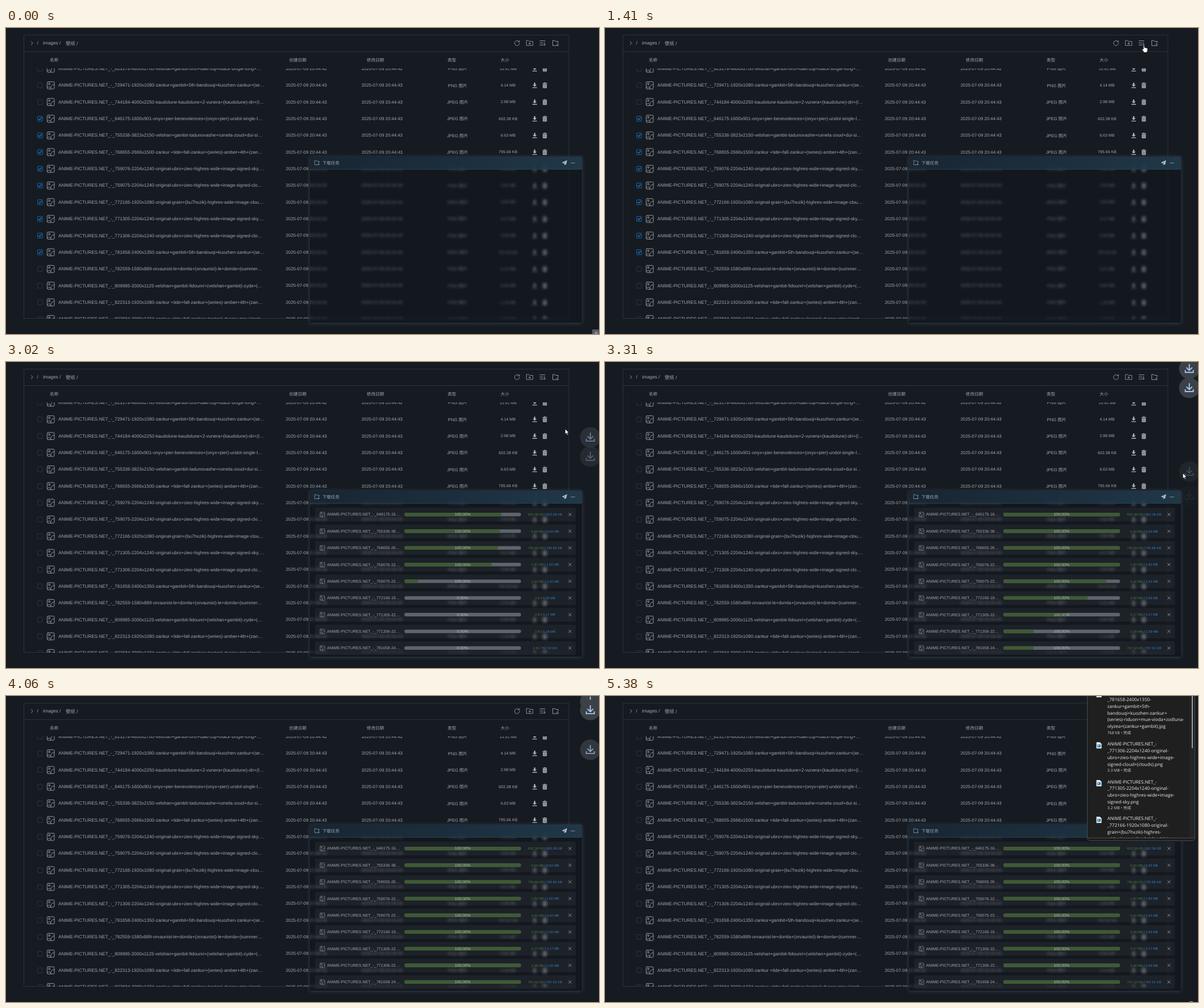
These frames come from a looping animation (1042x538 px, 5560 ms). An HTML page:

```html
<!DOCTYPE html>
<html lang="zh">
<head>
<meta charset="utf-8">
<title>下载任务</title>
<style>
html, body { margin: 0; width: 100%; height: 100%; overflow: hidden; background: #161b22; }
#stage { position: relative; width: 1042px; height: 538px; overflow: hidden; }
svg { position: absolute; left: 0; top: 0; display: block; }
text { font-family: "Liberation Sans", Arial, "Noto Sans CJK SC", "Noto Sans CJK", sans-serif; text-rendering: geometricPrecision; white-space: pre; }
#popup text { font-family: "Open Sans", "Noto Sans", "Noto Sans CJK SC", "Noto Sans CJK", sans-serif; }
#panel { position: absolute; left: 534px; top: 226px; width: 478px; height: 292px; background: rgba(15, 19, 25, .4);
  backdrop-filter: blur(2.2px); box-shadow: 0 1px 7px rgba(150, 165, 185, .26); }
#bar { height: 23px; background: linear-gradient(90deg, rgba(25, 41, 54, .85), rgba(29, 50, 66, .85) 50%, rgba(34, 60, 76, .9)); border-bottom: 1px solid #26414f; box-sizing: border-box; }
.line { fill: none; stroke: #959aa1; stroke-linecap: round; stroke-linejoin: round; }
</style>
</head>
<body>
<div id="stage">
  <svg id="list" width="1042" height="538"></svg>
  <div id="panel"><div id="bar"></div><svg id="tasks" width="478" height="292" viewBox="534 226 478 292"></svg></div>
  <svg id="top" width="1042" height="538"></svg>
</div>
<script>
const LOOP = 5560, PITCH = 29.35, SITE = "ANIME-PICTURES.NET_-_";
const $ = id => document.getElementById(id);
const clamp = v => Math.max(0, Math.min(1, v));
const text = (x, y, str, size, fill = "#a3a6ad", extra = "") =>
  `<text x="${x}" y="${y + size * .35}" font-size="${size}" fill="${fill}" ${extra}>${str}</text>`;
const icon = (x, y, body, scale = 1, extra = "") =>
  `<g transform="translate(${x} ${y}) scale(${scale})" ${extra}>${body}</g>`;
const line = (d, width = 1, extra = "") => `<path class="line" d="${d}" stroke-width="${width}" ${extra}/>`;

const picture = `<rect class="line" x="-6.3" y="-6.3" width="12.6" height="12.6" rx="1.6"/>
  <circle class="line" cx="-2.6" cy="-2.6" r="1.5"/>` + line("M-6 4.5L-3 2.2L0 4.2M0 6C0 1 2 -1.3 6 -1.6");
const save = `<path d="M-1.2-4.5h2.4v3.5H3.6L0 2.4-3.6-1h2.4zM-4 3.4h8v1.3h-8z" fill="#b0b4ba"/>`;
const trash = `<path d="M-4-4h2.3l.7-1h2l.7 1H4v1.2h-8zM-3.5-2.2h7v6.4q0 .8-.8.8h-5.4q-.8 0-.8-.8z" fill="#a6aab0"/>` +
  line("M-1.2-.5v4M1.2-.5v4", .7, 'style="stroke:#3a3f46"');
const folderDown = line("M1 4.5H-5V-4.5H-1.6L-.2-3H4.6V-.6M3.4 .2V5M1.4 3L3.4 5L5.4 3");
const folderPlus = line("M-5.5-4.3H-1.8L-.3-2.8H5.5V4.4H-5.5ZM0-.9V2.7M-1.8 .9H1.8", .9);
const refresh = line("M3.6-2.2A4.4 4.4 0 1 0 4.4 .4M4.2-4.2V-1.8H1.8", .9);
const sortDown = line("M-4.5-3.7H4.5M-4.5 0H1M-4.5 3.7H1M3.6-1V4.2M2 2.6L3.6 4.2L5.2 2.6", 1);

// name, type, size for each file
const files = [
  ["823178-4800x2700-velshan+gambit-ono+daki-zuji+black-single-long+…", "PNG", "13.51 MB"],
  ["729471-1920x1080-zankur+gambit+5th-bandouqi+kuozhen-zankur+(se…", "PNG", "4.14 MB"],
  ["744184-4000x2250-kaudolune-kaudolune+2-vunera+(kaudolune)-dri+(l…", "JPEG", "2.98 MB"],
  ["646175-1600x901-onyx+pier-benevolences+(onyx+pier)-undol-single-l…", "JPEG", "602.38 KB"],
  ["755336-3823x2150-velshan+gambit-tadunovashe+rumela-zoud+dui-si…", "JPEG", "6.63 MB"],
  ["768655-2666x1500-zankur +tide+fall-zankur+(series)-amber+4th+(zan…", "JPEG", "795.66 KB"],
  ["759076-2204x1240-original-ubro+zieo-highres-wide+image-signed-sky.…", "PNG", "1.82 MB"],
  ["759075-2204x1240-original-ubro+zieo-highres-wide+image-signed-clo…", "PNG", "3.42 MB"],
  ["772166-1920x1080-original-grain+(bu7hxzik)-highres-wide+image-clou…", "JPEG", "3.59 MB"],
  ["771305-2204x1240-original-ubro+zieo-highres-wide+image-signed-sky.…", "PNG", "3.17 MB"],
  ["771306-2204x1240-original-ubro+zieo-highres-wide+image-signed-clo…", "PNG", "3.28 MB"],
  ["781658-2400x1350-zankur+gambit+5th-bandouqi+kuozhen-zankur+(se…", "JPEG", "767.52 KB"],
  ["782559-1580x889-orvaunist-le+domla+(orvaunist)-le+domla+(summer…", "PNG", "2.21 MB"],
  ["809985-2000x1125-velshan+gambit-fidounri+(velshan+gambit)-zyde+(…", "PNG", "6.66 MB"],
  ["822313-1920x1080-zankur +tide+fall-zankur+(series)-amber+4th+(zan…", "PNG", "1.13 MB"],
  ["822684-2000x1324-zankur +tide+fall-zankur+(series)-dusan+mio+(zank…", "JPEG", "1.32 MB"]
];
const picked = files.slice(3, 12);

const row = ([name, type, size], i) => {
  const y = 71.2 + PITCH * i, mid = 'text-anchor="middle"';
  const check = i > 2 && i < 12 ? `<g class="check"><rect x="55.5" y="${y - 4}" width="8.6" height="8.6" rx="1" fill="#10202f" stroke="#1a5fa3"/>` +
    line(`M57.6 ${y + .4}l1.7 1.8l3.1-3.9`, 1.1, 'style="stroke:#2b80d0"') + "</g>" : "";
  return `<rect x="55.5" y="${y - 4}" width="8.6" height="8.6" rx="1" fill="none" stroke="#30353c"/>` + check +
    icon(78.6, y + .3, picture) + text(92, y, SITE + name, 8.07) +
    text(491.8, y, `2025-07-09 20:44:4${i ? 3 : 2}`, 7.75) + text(624.8, y, `2025-07-09 20:44:4${i ? 3 : 2}`, 7.75) +
    text(793.5, y + .4, type + " 图片", 7.6, "#a3a6ad", mid) + text(882.3, y, size, 7.05, "#a3a6ad", mid) +
    icon(929, y + .3, save) + icon(946.8, y + .3, trash);
};

$("list").innerHTML = `<clipPath id="rows"><rect x="32" y="71" width="957" height="440"/></clipPath>
  <path d="M31.5 12.5H989V510.5H31.5ZM31.5 41.5H989" fill="none" stroke="#2d333b"/>` +
  line("M44.3 23.8L47 26.5L44.3 29.2") + text(54.5, 26.5, "/", 8.3) + text(65, 26.5, "images /", 8.3) + text(105, 26.8, "壁纸 /", 8.3) +
  icon(898, 26.3, refresh) + icon(920.3, 26.3, folderPlus) + icon(942.6, 26.3, sortDown) + icon(965.7, 26.5, folderDown) +
  [[77, "名称"], [497.6, "创建日期"], [633.8, "修改日期"], [776, "类型"], [869, "大小"]].map(([x, s]) => text(x, 56, s, 7.6)).join("") +
  `<g clip-path="url(#rows)">${files.map(row).join("")}</g>`;

const task = ([name, , size], i) => {
  const y = 268 + PITCH * i;
  return `<rect x="543" y="${y - 11.7}" width="458.5" height="24" rx="2" fill="#fff" fill-opacity=".045"/>` +
    icon(556, y + .3, picture, .66) + text(564, y, SITE + name.split("-")[0] + "-" + name.split("-")[1].slice(0, 2) + "…", 7.09) +
    `<rect x="700" y="${y - 3}" width="205" height="6.2" rx="3.1" fill="#5e646b"/>
     <rect class="fill" x="700" y="${y - 3}" height="6.2" rx="3.1" fill="#3e5a34"/>` +
    text(802.3, y, "", 7.1, "#b0b5ba", 'class="percent" text-anchor="middle"') +
    text(947.3, y + .3, `<tspan class="got" fill="#3f7f36"></tspan> / <tspan fill="#2f7fc2">${size}</tspan>`, 5.92, "#8d9299", 'text-anchor="middle"') +
    line(`M988.7 ${y - 2.2}l4.6 4.6m0-4.6l-4.6 4.6`, .9);
};

$("tasks").innerHTML = icon(546.5, 236.8, folderDown, .82) + text(556, 237, "下载任务", 7.5) +
  `<path d="M986 232.5L977 236.6L979.8 238.2L983.8 234.8L980.8 238.8V241.5L982.2 239.6L984 240.6Z" fill="#b9c3ca"/>` +
  line("M992.5 237.3H999.5", .9) + `<g id="queue">${picked.map(task).join("")}</g>`;

const badge = `<g class="badge"><circle r="18" fill="#3c4047"/>` +
  line("M0-7.5V3M-4.6-1.4L0 3.2L4.6-1.4M-7 3.2V6.6H7V3.2", 1.9, 'style="stroke:#a9c4ee"') + "</g>";
const documentIcon = y => `<path d="M863.5 ${y - 5.5}h6l3 3v8h-9z" fill="#e9edf0"/><rect x="865" y="${y - 1.6}" width="6" height="5" rx="1" fill="#2b7fb8"/>
  <circle cx="867" cy="${y + .4}" r="1.1" fill="#d6ecf8"/>`;

// centre of the first line, lines of the name, status
const downloads = [
  [-5.6, [SITE.slice(0, -1), "_781658-2400x1350-", "zankur+gambit+5th-", "bandouqi+kuozhen-zankur+", "(series)-riduon+mue-vioda+zodluna-", "olyzea+(zankur+gambit).jpg"], "768 KB"],
  [84.4, [SITE.slice(0, -1), "_771306-2204x1240-original-", "ubro+zieo-highres-wide+image-", "signed-cloud+(clouds).png"], "3.3 MB"],
  [150.8, [SITE.slice(0, -1), "_771305-2204x1240-original-", "ubro+zieo-highres-wide+image-", "signed-sky.png"], "3.2 MB"],
  [215.3, [SITE.slice(0, -1), "_772166-1920x1080-original-", "grain+(bu7hxzik)-highres-", "wide+image-cloud+(clouds).jpg"], "3.6 MB"]
];
const download = ([y, lines, size]) => documentIcon(y + 2.4) +
  lines.map((s, i) => text(882.7, y + i * 11.8, s, 8, "#ececec")).join("") +
  text(882.7, y + lines.length * 11.8 - 1, size + " • 完成", 6.8, "#d0d0d0");

// start times of the rising badges and of the progress bars
const badgeStarts = [2739, 2820, 3173, 3274, 3360, 3420, 3484, 3520, 3688];
const barStarts = [2700, 2710, 2720, 2750, 2953, 3052, 3120, 3200, 3200];

$("top").innerHTML = `<clipPath id="view"><rect x="847" y="0" width="190" height="249.5"/></clipPath>
  <g id="corner"><rect x="1030" y="530" width="12" height="8" fill="#565b61"/><circle cx="1037" cy="536" r="2.5" fill="#8a8f95"/></g>
  <ellipse id="dot" cx="1030" cy="538.5" rx="4" ry="1.8" fill="#9a9da1"/>` +
  badgeStarts.map(() => badge).join("") +
  `<g id="popup"><rect x="847.5" y="-10" width="189" height="264.5" rx="5" fill="#1f1f1f" stroke="#45484c"/>
  <path d="M848 249.5H1037" stroke="#4a4a4a"/><rect x="1027" y="0" width="9" height="249" fill="#242424"/>
  <rect x="1031" y="-4" width="2" height="96" rx="1" fill="#9b9b9b"/>
  <g clip-path="url(#view)">${downloads.map(download).join("")}</g></g>
  <circle id="click" cx="945" cy="26.5" r="7.2" fill="#c8c010" fill-opacity=".62"/>
  <g id="cursor" stroke="#111" stroke-width=".8" fill="#fff" stroke-linejoin="round">
  <path id="arrow" d="M0 0V9.6L2.2 7.6L3.7 11L5.3 10.3L3.8 7H6.8Z"/>
  <path id="hand" d="M-1 .8Q0-.6 1 .8V4.4Q2.2 3.8 3 4.8Q4.2 4.3 4.8 5.3Q6.2 5 6.5 6.4V9Q6.2 10.6 5.4 11.4V13H-.4Q-.6 11.4-2 9.8L-3.5 7.4Q-3 6-1 7.4Z"/></g>`;

const path = [[290, 1040, 530], [560, 1024, 300], [830, 1014, 160], [870, 1014, 160], [1410, 947, 30], [1490, 947, 30],
  [1660, 945, 27], [2780, 945, 27], [3230, 1015, 196], [3310, 1015, 196], [3420, 1046, 120]];

function cursorAt(t) {
  const i = path.findIndex(p => p[0] > t);
  if (i < 1) return null;
  const [a, b] = [path[i - 1], path[i]], k = (t - a[0]) / (b[0] - a[0]);
  return [a[1] + (b[1] - a[1]) * k, a[2] + (b[2] - a[2]) * k];
}

// the CSS "ease" curve
function ease(x) {
  let low = 0, high = 1, s = 0;
  for (let i = 0; i < 18; i++) {
    s = (low + high) / 2;
    if (.75 * s * (1 - s) + s ** 3 < x) low = s; else high = s;
  }
  return .3 * s * (1 - s) ** 2 + 3 * s * s * (1 - s) + s ** 3;
}

const show = (el, on) => el.style.display = on ? "" : "none";
const all = selector => [...document.querySelectorAll(selector)];
const checks = all(".check"), fills = all(".fill"), percents = all(".percent"), gots = all(".got"), badges = all(".badge");

function draw() {
  const t = performance.now() % LOOP;
  show($("corner"), t < 40);
  show($("dot"), t >= 5380);
  checks.forEach(c => show(c, t < 2700));
  show($("queue"), t >= 2700);
  show($("click"), t >= 2650 && t < 2750);

  barStarts.forEach((start, i) => {
    const done = t >= start;
    fills[i].setAttribute("width", 205 * (done ? ease(clamp((t - start) / 600)) : 0));
    percents[i].textContent = done ? "100.00%" : "0.00%";
    gots[i].textContent = done ? picked[i][2] : "0 B";
  });

  badgeStarts.forEach((start, i) => {
    const y = 250 - (t - start) * .4167;
    show(badges[i], t >= start && y > -20);
    badges[i].setAttribute("transform", `translate(1026.7 ${y})`);
    badges[i].setAttribute("opacity", clamp((250 - y) / 205));
  });

  const open = clamp((t - 4290) / 140);
  show($("popup"), open > 0);
  $("popup").setAttribute("opacity", open);
  $("popup").setAttribute("transform", `translate(0 ${-4 * (1 - open)})`);

  const at = cursorAt(t), pointing = t > 1330 && t < 2850;
  show($("cursor"), at);
  show($("hand"), pointing);
  show($("arrow"), !pointing);
  if (at) $("cursor").setAttribute("transform", `translate(${at})`);
  requestAnimationFrame(draw);
}
draw();
</script>
</body>
</html>
```
